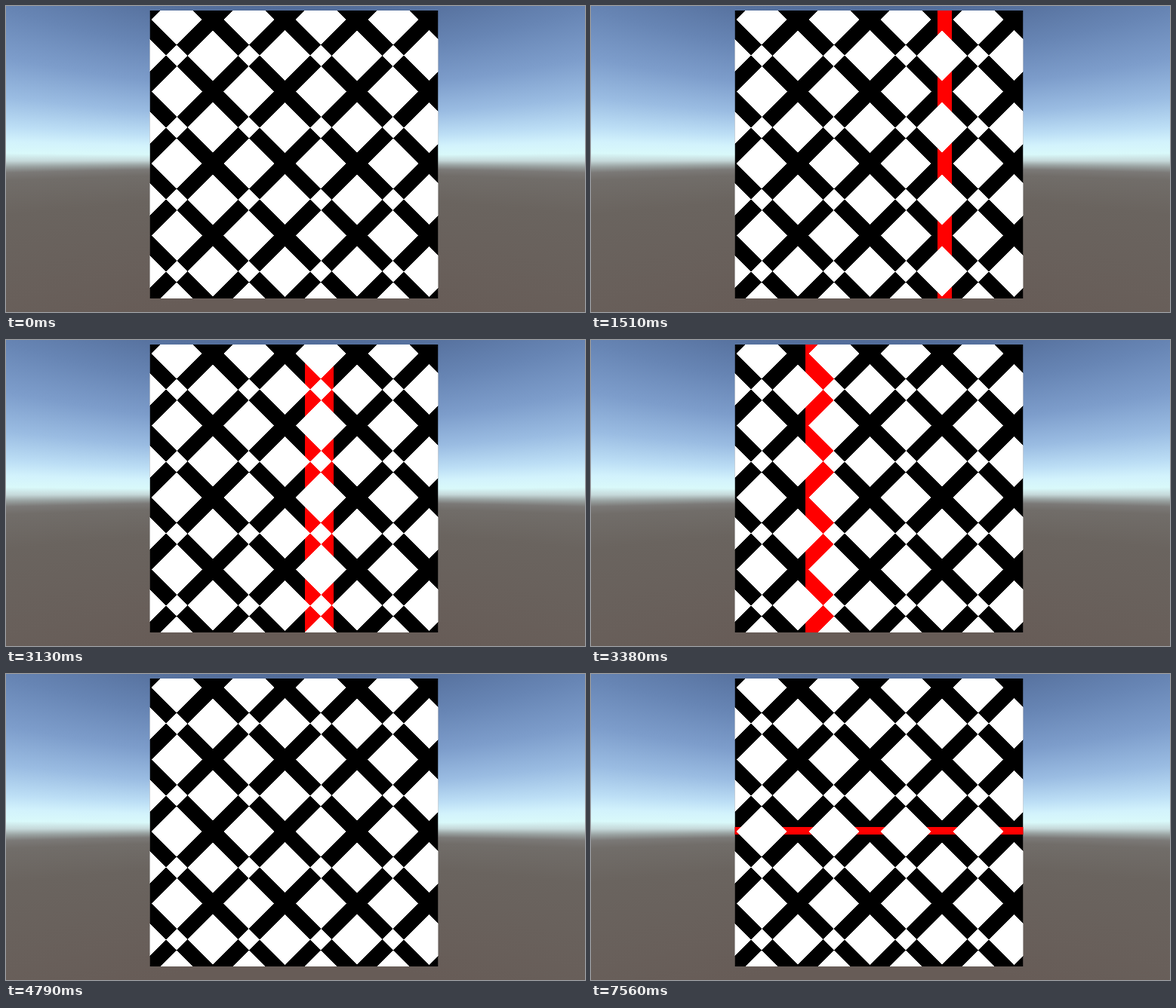
Recreate the animation shown at these times as an HTML page. Size 767x406 px, loop 8 s.

```html
<!DOCTYPE html>
<html lang="en">
<head>
<meta charset="utf-8">
<title>Scanning band</title>
<style>
  html, body { margin: 0; width: 100%; height: 100%; overflow: hidden; background: #675c57; }
  svg { display: block; width: 100%; height: 100%; }
</style>
</head>
<body>
<svg viewBox="0 0 767 406" preserveAspectRatio="none">
  <defs>
    <linearGradient id="sky" gradientUnits="userSpaceOnUse" x1="0" x2="0"></linearGradient>
    <clipPath id="panel"><rect x="190.5" y="6" width="382" height="382"/></clipPath>
  </defs>
  <g id="backdrop" fill="url(#sky)" shape-rendering="crispEdges"></g>
  <g clip-path="url(#panel)">
    <rect x="190.5" y="6" width="382" height="382"/>
    <rect id="column" y="6" height="382" fill="#f00" shape-rendering="crispEdges"/>
    <rect id="row" x="190" width="383" fill="#f00" shape-rendering="crispEdges"/>
    <path id="diamonds" fill="#fff" shape-rendering="crispEdges"/>
  </g>
</svg>
<script>
const LOOP = 8000, LEFT = 190.5, TOP = 6, TILE = 95.5, HORIZON = 203;
const $ = id => document.getElementById(id);

function add(parent, tag, attrs) {
  const el = document.createElementNS('http://www.w3.org/2000/svg', tag);
  set(el, attrs);
  parent.append(el);
}

function set(el, attrs) {
  for (const k in attrs) el.setAttribute(k, attrs[k]);
}

// Sky and ground colours by height, measured at the panel's edge
function drawBackdrop() {
  const stops = [
    [-40, '#506a97'], [0, '#57729f'], [50, '#6785b4'], [100, '#7d9dcb'],
    [140, '#9abce2'], [170, '#bcdef5'], [185, '#d2f2fc'], [197, '#d9f9fa'],
    [205, '#c5d8d9'], [211, '#9aa3a2'], [217, '#7b7977'], [225, '#716d69'],
    [260, '#6a645f'], [406, '#675c57']
  ];
  const first = stops[0][0], last = stops[stops.length - 1][0];
  set($('sky'), { y1: first - HORIZON, y2: last - HORIZON });
  for (const [y, color] of stops)
    add($('sky'), 'stop', { offset: (y - first) / (last - first), 'stop-color': color });

  // Perspective stretches the sky away from the horizon towards the sides
  for (let x = 0; x < 767; x += 4) {
    const stretch = Math.hypot(351, x + 2 - 383.5) / 400;
    add($('backdrop'), 'rect', {
      x, y: -280, width: 4, height: 560,
      transform: `translate(0 ${HORIZON}) scale(1 ${stretch})`
    });
  }
}

function drawDiamonds() {
  const kinds = [[.375, .125, .35], [.875, .625, .35], [.375, .625, .15]];
  let d = '';
  for (const [u, v, size] of kinds)
    for (let i = -1; i < 5; i++)
      for (let j = -1; j < 5; j++) {
        const x = LEFT + (u + i) * TILE, y = TOP + (v + j) * TILE, r = size * TILE;
        d += `M${x} ${y - r}l${r} ${r}l${-r} ${r}l${-r} ${-r}z`;
      }
  $('diamonds').setAttribute('d', d);
}

// start, end, steps, position from/to, thickness from/to
const columnMoves = [
  [70, 490, 12, 570, 499, 19, 19],
  [540, 740, 6, 494, 460, 18, 18],
  [1510, 2070, 12, 459, 440, 19, 38],
  [3050, 3380, 13, 430, 284, 38, 38],
  [4200, 4790, 16, 295, 573, 38, 38]
];
const rowMoves = [
  [7060, 7060, 1, -2, -2, 10, 10],
  [7080, 7560, 15, 10, 203, 10, 10]
];

function bandAt(moves, t) {
  const move = moves.filter(m => m[0] <= t).pop();
  if (!move) return [0, 0];
  const [start, end, steps, a, b, w0, w1] = move;
  const raw = end > start ? Math.min(1, (t - start) / (end - start)) : 1;
  const k = Math.floor(raw * steps + 1e-6) / steps;
  return [Math.round(a + (b - a) * k), Math.round(w0 + (w1 - w0) * k)];
}

function render(t) {
  const [x, width] = bandAt(columnMoves, t);
  const [y, height] = bandAt(rowMoves, t);
  set($('column'), { x, width });
  set($('row'), { y, height });
}

function tick() {
  render(performance.now() % LOOP);
  requestAnimationFrame(tick);
}

drawBackdrop();
drawDiamonds();
tick();
</script>
</body>
</html>
```
